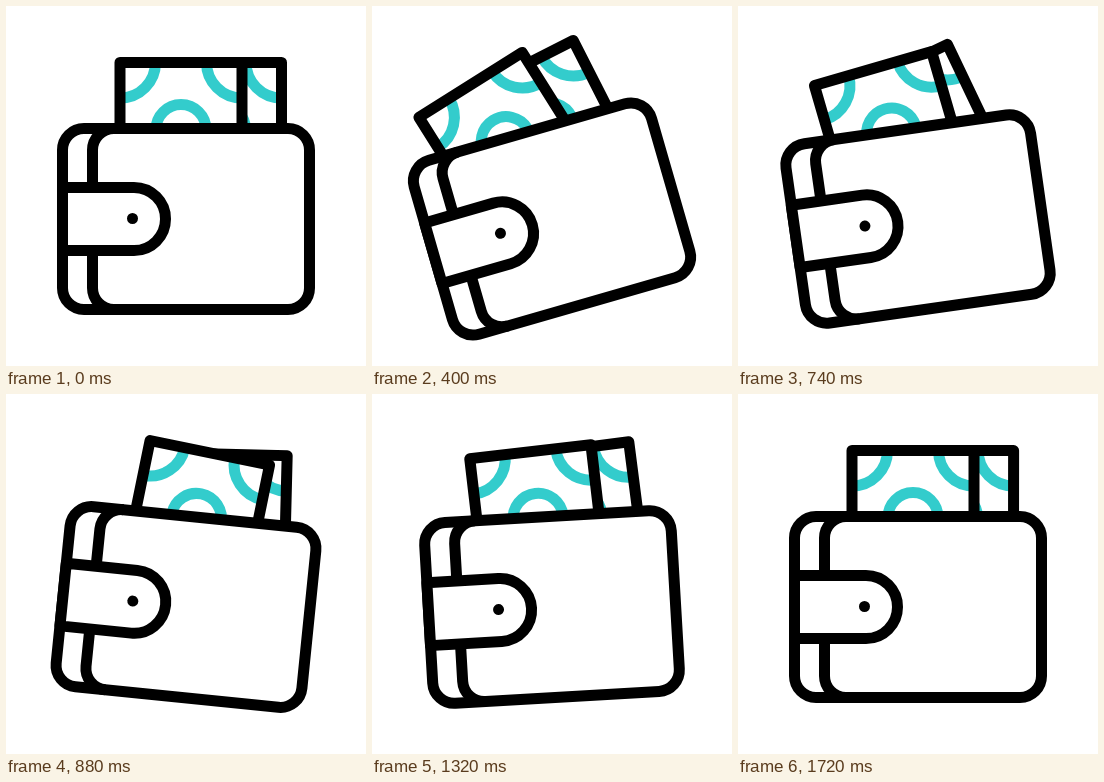
An HTML page that plays this animation: 360x360 px, repeating every 2 s.

```html
<!DOCTYPE html>
<html lang="en">
<head>
<meta charset="utf-8">
<title>Wallet</title>
<style>
  html, body { margin: 0; width: 100%; height: 100%; overflow: hidden; background: #fff; }
  svg { display: block; width: 100vw; height: 100vh; }
  .line { fill: #fff; stroke: #000; stroke-width: 11; stroke-linejoin: round; }
  .ring { fill: none; stroke: #3cc; stroke-width: 11; }
</style>
</head>
<body>
<svg viewBox="0 0 360 360">
  <defs>
    <!-- Banknote with its origin at the middle of the bottom edge -->
    <g id="note">
      <rect x="-61" y="-130.5" width="122" height="130.5" fill="#fff"/>
      <path class="ring" d="M-25.5 -130.5A35.5 35.5 0 0 1 -61 -95"/>
      <path class="ring" d="M25.5 -130.5A35.5 35.5 0 0 0 61 -95"/>
      <circle class="ring" cy="-63.5" r="25"/>
      <rect class="line" x="-61" y="-130.5" width="122" height="130.5" style="fill:none"/>
    </g>
  </defs>
  <g id="wallet">
    <use id="back" href="#note"/>
    <use id="front" href="#note"/>
    <rect class="line" x="56.5" y="122.5" width="247" height="181" rx="21.5"/>
    <path class="line" d="M108 122.5A21.5 21.5 0 0 0 86.5 144V282A21.5 21.5 0 0 0 108 303.5" style="fill:none"/>
    <path class="line" d="M56.5 181.5H128A31.5 31.5 0 0 1 128 244.5H56.5Z"/>
    <circle cx="126.5" cy="212.5" r="5.5"/>
  </g>
</svg>
<script>
  const LOOP = 2000;
  const LAG = 105; // the rear note trails the wallet
  const SWING = [[0, 0], [560, -20], [980, 10], [1260, -5], [1460, 2.5], [1630, 0]];

  const byId = id => document.getElementById(id);
  const wallet = byId('wallet'), front = byId('front'), back = byId('back');

  function angleAt(t) {
    if (t <= 0) return 0;
    for (let i = 1; i < SWING.length; i++) {
      const [t0, a0] = SWING[i - 1], [t1, a1] = SWING[i];
      if (t < t1) {
        const u = (t - t0) / (t1 - t0);
        return a0 + (a1 - a0) * u * u * (3 - 2 * u);
      }
    }
    return 0;
  }

  function placeNote(note, x, angle) {
    note.setAttribute('transform', `translate(${x} 187) rotate(${angle})`);
  }

  function draw(t) {
    const angle = angleAt(t);
    wallet.setAttribute('transform', `rotate(${angle} 180 213)`);
    placeNote(front, 175, angle);
    placeNote(back, 214.5, angleAt(t - LAG));
  }

  const start = performance.now();
  function tick() {
    draw((performance.now() - start) % LOOP);
    requestAnimationFrame(tick);
  }
  tick();
</script>
</body>
</html>
```
